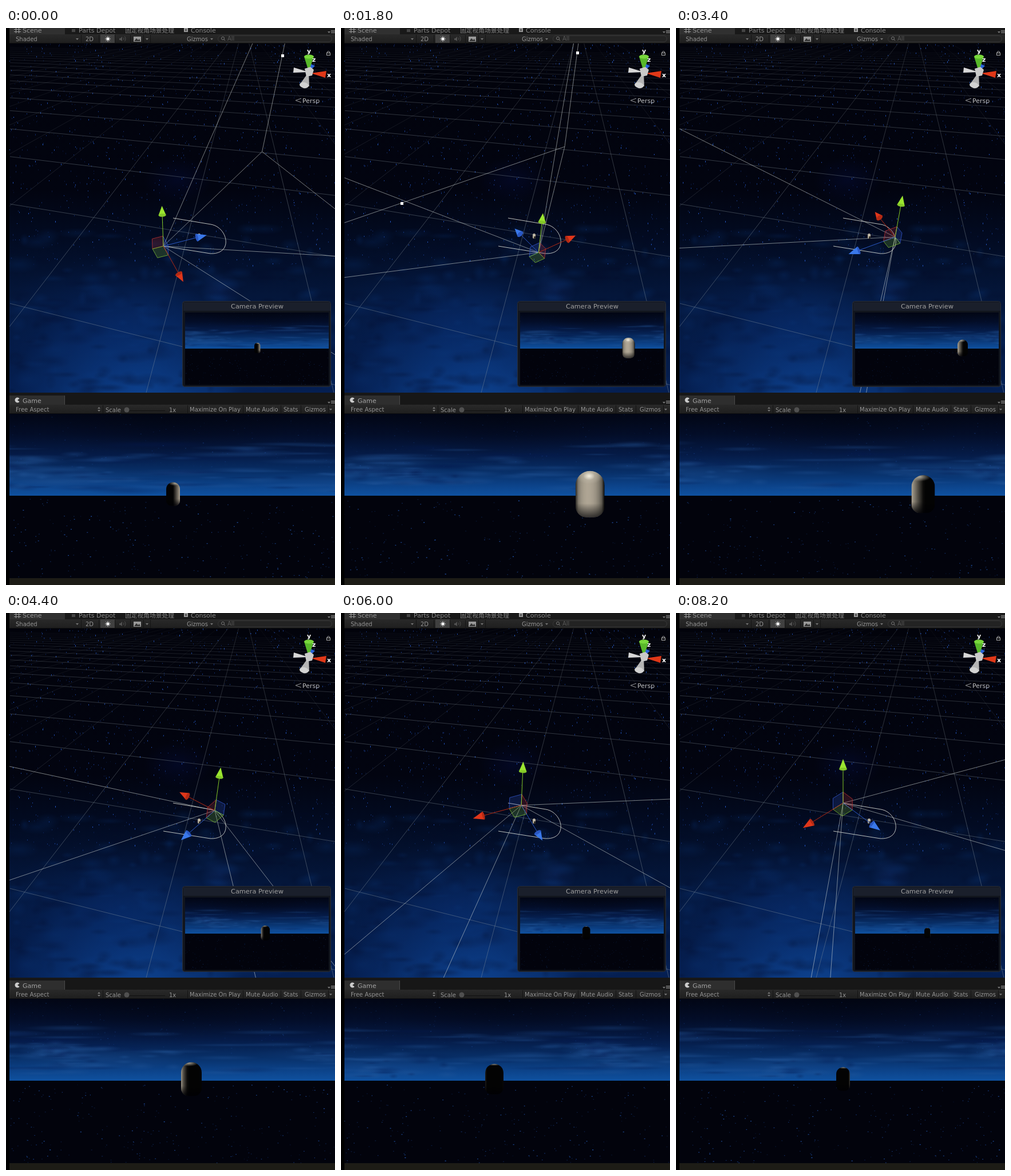
Recreate the animation shown at these times as an HTML page with a canvas. Size 575x973 px, loop 8.4 s.

```html
<!DOCTYPE html>
<html lang="en">
<head>
<meta charset="utf-8">
<title>Scene and game view</title>
<style>
  html, body { margin: 0; width: 100%; height: 100%; overflow: hidden; background: #000; }
  canvas { display: block; }
</style>
</head>
<body>
<canvas id="stage" width="575" height="973"></canvas>
<script>
const ctx = document.getElementById('stage').getContext('2d');
const LOOP = 8400, STEP = 200, RAD = Math.PI / 180;
const UI_FONT = '"DejaVu Sans", sans-serif';

// time, position along the track (0..3), heading in degrees, capsule x and width in the game view
const KEYS = [
  [600, 0, 20.7, 292, 24],
  [1200, .57, 97, 491, 62],
  [2600, 1.24, 160, 361, 36],
  [3400, 1.58, 208.5, 432, 41],
  [4400, 1.92, 232.5, 324, 36],
  [6000, 2.65, 292, 268, 32],
  [6800, 3, 312.5, 292, 24]
];

function poseAt(time) {
  const t = Math.max(KEYS[0][0], Math.min(6800, time));
  const i = Math.max(1, KEYS.findIndex(k => k[0] >= t));
  const a = KEYS[i - 1], b = KEYS[i], f = (t - a[0]) / (b[0] - a[0]);
  const [, along, heading, capsuleX, capsuleW] = a.map((v, n) => v + (b[n] - v) * f);
  return { along, heading, capsuleX, capsuleW };
}

function randomizer(seed) {
  return () => (seed = (seed * 16807) % 2147483647) / 2147483647;
}

function rect(c, x, y, w, h, fill) {
  c.fillStyle = fill;
  c.fillRect(x, y, w, h);
}

function poly(c, points, fill, stroke, close = true) {
  c.beginPath();
  points.forEach(p => c.lineTo(p[0], p[1]));
  if (close) c.closePath();
  if (fill) { c.fillStyle = fill; c.fill(); }
  if (stroke) { c.strokeStyle = stroke; c.stroke(); }
}

const line = (c, a, b, color) => poly(c, [a, b], null, color, false);

function vertical(c, y0, y1, stops) {
  const g = c.createLinearGradient(0, y0, 0, y1);
  stops.forEach(([at, color]) => g.addColorStop(at, color));
  return g;
}

function glow(c, x, y, rx, ry, rgb, alpha) {
  c.save();
  c.translate(x, y);
  c.scale(rx, ry);
  const g = c.createRadialGradient(0, 0, 0, 0, 0, 1);
  g.addColorStop(0, `rgba(${rgb},${alpha})`);
  g.addColorStop(1, `rgba(${rgb},0)`);
  rect(c, -1, -1, 2, 2, g);
  c.restore();
}

function text(c, str, x, y, size = 10, color = '#949494', font = UI_FONT, weight = 'normal') {
  c.font = `${weight} ${size}px ${font}`;
  c.fillStyle = color;
  c.fillText(str, x, y);
}

/* ---------- scene view ---------- */
const FOCAL = 528, CX = 291, CY = 332;
const SIN = Math.sin(40 * RAD), COS = Math.cos(40 * RAD);
const HALF_W = 1.05, HALF_H = .53, FAR = 1.84;

const toView = (x, z, h) => [x, z * SIN + h * COS, 1 + z * COS - h * SIN];
const project = ([x, y, z]) => [CX + FOCAL * x / z, CY - FOCAL * y / z];

function groundAt([x, y]) {
  const v = (CY - y) / FOCAL, z = v / (SIN - v * COS);
  return [(x - CX) / FOCAL * (1 + z * COS), z];
}

function line3d(a, b, color) {
  const near = .02;
  if (a[2] < near && b[2] < near) return;
  const clip = (p, q) => p[2] >= near ? p
    : p.map((v, i) => v + (q[i] - v) * (near - p[2]) / (q[2] - p[2]));
  line(ctx, project(clip(a, b)), project(clip(b, a)), color);
}

function trackPoint(u) {
  if (u <= 1) return [275 + 82 * u, 381 + 13 * u];
  if (u >= 2) return [358 - 66 * (u - 2), 343 - 11 * (u - 2)];
  const t = u - 1, s = 1 - t;
  const bez = (a, b, c, d) => a * s ** 3 + 3 * b * s * s * t + 3 * c * s * t * t + d * t ** 3;
  return [bez(357, 398, 388, 358), bez(394, 396, 348, 343)];
}

function drawGrid(c) {
  const rowY = n => 1 / (.00204 + .00112 * n) - 9;
  for (let n = -1; n < 20; n++) {
    const y = rowY(n);
    line(c, [7, y], [575, y + 568 * (y + 9) / 1957], `rgba(140,152,160,${Math.max(.06, .4 - n * .02)})`);
  }
  for (let n = -9; n < 5; n++) {
    const main = n > -2 && n < 2;
    line(c, [416, -9], [245 + 328 * n, 637], vertical(c, 27, 637, [
      [0, `rgba(140,152,160,${main ? .2 : .05})`], [.5, `rgba(140,152,160,${main ? .4 : .22})`]]));
  }
}

function drawSceneBackdrop(c) {
  c.save();
  c.beginPath();
  c.rect(6, 27, 569, 610);
  c.clip();
  rect(c, 6, 27, 569, 610, vertical(c, 27, 637, [
    [0, '#02030b'], [.42, '#020410'], [.56, '#020b22'], [.72, '#04163a'], [1, '#051f52']]));
  glow(c, 235, 650, 220, 210, '16,78,165', .75);
  glow(c, 200, 520, 220, 120, '6,40,105', .5);
  glow(c, 375, 458, 36, 32, '22,62,140', .35);
  glow(c, 300, 265, 60, 40, '4,12,55', .5);
  const rnd = randomizer(77);
  for (let i = 0; i < 260; i++) {
    const x = 6 + rnd() * 569, y = 350 + rnd() * 290, dark = rnd() < .5;
    glow(c, x, y, 8 + rnd() * 30, 4 + rnd() * 12, dark ? '1,8,36' : '10,56,125', .2);
  }
  for (let i = 0; i < 1100; i++) {
    const x = 6 + rnd() * 569, y = 27 + rnd() ** 1.3 * 390, bright = rnd();
    rect(c, Math.floor(x), Math.floor(y), 1, 1 + rnd() * 2,
      `rgba(${20 + bright * 20},${50 + bright * 45},${130 + bright * 80},${.3 + bright * bright * .6})`);
  }
  drawGrid(c);
  c.restore();
}

function drawFrustum(origin, heading) {
  const [ox, oz] = groundAt(origin);
  const c = Math.cos(heading * RAD), s = Math.sin(heading * RAD);
  const far = (side, up) => toView(
    ox + FAR * (c + side * HALF_W * s), oz + FAR * (s - side * HALF_W * c), FAR * up * HALF_H);
  const corners = [[-1, -1], [1, -1], [1, 1], [-1, 1]];
  const eye = toView(ox, oz, 0), color = 'rgba(215,220,215,.55)';
  corners.forEach((corner, i) => {
    const next = corners[(i + 1) % 4];
    line3d(eye, far(...corner), color);
    line3d(far(...corner), far(...next), color);
    const mid = far((corner[0] + next[0]) / 2, (corner[1] + next[1]) / 2);
    if (mid[2] > .1) {
      const [x, y] = project(mid);
      rect(ctx, Math.round(x) - 2, Math.round(y) - 2, 5, 5, '#fff');
    }
  });
}

function arrow([x, y], [dx, dy], color, dark) {
  const len = Math.hypot(dx, dy), ux = dx / len, uy = dy / len;
  const cone = Math.min(19, len * .23), half = 4.5 + len * .03;
  const tip = [x + dx, y + dy], base = [tip[0] - ux * cone, tip[1] - uy * cone];
  line(ctx, [x, y], base, dark);
  poly(ctx, [tip, [base[0] - uy * half, base[1] + ux * half],
    [base[0] + uy * half, base[1] - ux * half]], color);
  ctx.beginPath();
  ctx.ellipse(base[0], base[1], Math.max(2, 7 - len * .06), half, Math.atan2(uy, ux), 0, 7);
  ctx.fillStyle = dark;
  ctx.fill();
}

function drawHandles(origin, heading) {
  const groundAxis = deg => {
    const s = Math.sin(deg * RAD), k = 1 - .16 * s;
    return [86 * Math.cos(deg * RAD) * k, -58 * s * k];
  };
  const z = groundAxis(heading), x = groundAxis(heading - 90);
  const y = [(origin[0] - 292) * .145, -77 + (origin[1] - 332) * .14];
  const side = v => v.map(n => n * .25 * (v !== y && v[1] < 0 ? -1 : 1));
  const plane = (a, b, rgb) => {
    const p = side(a), q = side(b), [ox, oy] = origin;
    poly(ctx, [origin, [ox + p[0], oy + p[1]], [ox + p[0] + q[0], oy + p[1] + q[1]],
      [ox + q[0], oy + q[1]]], `rgba(${rgb},.22)`, `rgba(${rgb},.8)`);
  };
  plane(x, y, '50,85,200');
  plane(z, y, '185,50,50');
  plane(x, z, '125,185,50');
  const axes = [[x, '#e0361a', '#b32a14'], [z, '#3a78ea', '#2a58c4']].sort((a, b) => a[0][1] - b[0][1]);
  axes.forEach(([v, color, dark]) => arrow(origin, v, color, dark));
  arrow(origin, y, '#9be530', '#84c828');
}

function drawTrack() {
  ctx.beginPath();
  ctx.moveTo(275, 381);
  ctx.lineTo(357, 394);
  ctx.bezierCurveTo(398, 396, 388, 348, 358, 343);
  ctx.lineTo(292, 332);
  ctx.strokeStyle = 'rgba(235,235,225,.8)';
  ctx.stroke();
}

function drawCompass(c) {
  poly(c, [[529, 77], [503, 69], [502, 78]], '#d8d8d8');
  poly(c, [[529, 77], [531, 62], [540, 66]], '#2a62d8');
  poly(c, [[529, 76], [521, 50], [538, 50]], '#58b82a');
  c.beginPath(); c.ellipse(529.5, 50, 8.5, 3.5, 0, 0, 7); c.fillStyle = '#79d83c'; c.fill();
  poly(c, [[533, 79], [560, 75], [558, 87]], '#e03818');
  poly(c, [[529, 77], [513, 99], [530, 102]], '#b4b4b4');
  c.beginPath(); c.ellipse(521, 100, 8, 5, .2, 0, 7); c.fillStyle = '#d2d2d2'; c.fill();
  poly(c, [[522, 71], [532, 68], [538, 73], [535, 83], [525, 85]], '#c9c9c9');
  [['y', 526, 44], ['z', 535, 59], ['x', 561, 86]].forEach(([name, x, y]) =>
    text(c, name, x, y, 11, '#fff', UI_FONT, 'bold'));
  c.strokeStyle = '#aaa';
  c.strokeRect(560.5, 43.5, 6, 4);
  c.beginPath(); c.arc(563.5, 43, 2.3, Math.PI, 0); c.stroke();
  [[516, 123], [516, 130]].forEach(p => line(c, [506, 126.5], p, '#999'));
  text(c, 'Persp', 518, 131, 11, '#c0c0c0');
}

/* ---------- game view, also used for the preview ---------- */
const PX_PER_DEG = 6.1;
const stars = (() => {
  const rnd = randomizer(4242);
  return Array.from({ length: 1700 }, () => ({ az: rnd() * 360, y: rnd() ** .8 * 287, glow: rnd(), size: rnd() }));
})();
// azimuth, height, half width, half height, strength
const CLOUDS = [[70, 95, 100, 22, .4], [56, 112, 190, 24, .35], [175, 96, 210, 15, .35],
  [150, 112, 160, 16, .3], [266, 90, 65, 20, .42], [252, 104, 160, 22, .3], [330, 120, 180, 20, .25]];
// small wisps scattered inside the clouds and along the horizon
const wisps = (() => {
  const rnd = randomizer(919);
  const puff = (az, y, rx) => ({ az, y, rx, ry: 2 + rnd() * 5, dark: rnd() < .4 });
  const inClouds = CLOUDS.flatMap(([az, y, rx, ry]) => Array.from({ length: 22 }, () =>
    puff(az + (rnd() - .5) * rx / 4, y + (rnd() - .5) * ry * 1.6, 8 + rnd() * 28)));
  const bands = Array.from({ length: 150 }, () => puff(rnd() * 360, 50 + rnd() * 85, 25 + rnd() * 70));
  return inClouds.concat(bands);
})();

function wrapDegrees(d) {
  return ((d + 180) % 360 + 360) % 360 - 180;
}

function drawCapsule(x, w, heading) {
  const top = 137 - w * .73, r = w / 2, bottom = 143 + w * .74;
  const offset = (heading - 116) * RAD;
  const shade = ctx.createLinearGradient(x - r, 0, x + r, 0);
  for (let i = 0; i <= 10; i++) {
    const n = i / 5 - 1;
    const facingLight = Math.cos(offset) * Math.sqrt(1 - n * n) - Math.sin(offset) * n;
    const lit = Math.max(.02, (facingLight + .12) / 1.12) * .92;
    shade.addColorStop(i / 10, `rgb(${190 * lit},${180 * lit},${161 * lit})`);
  }
  const facing = (1 + Math.cos(offset)) / 2;
  ctx.save();
  ctx.beginPath();
  ctx.roundRect(x - r, top, w, bottom - top, [r, r, r * .75, r * .75]);
  ctx.clip();
  rect(ctx, x - r, top, w, bottom - top, shade);
  glow(ctx, x - Math.sin(offset) * r * .3, top + r * .3 * facing, r * .95, r * (.2 + facing * .4), '196,190,174', .8);
  if (facing > .7) glow(ctx, x - Math.sin(offset) * r * .5, top + r * .35, r * .4, r * .28, '255,250,235', .8);
  rect(ctx, x - r, top, w, bottom - top, vertical(ctx, top, bottom, [
    [0, 'rgba(0,0,2,0)'], [.7, 'rgba(0,0,2,0)'], [1, `rgba(0,0,4,${.95 - facing * .25})`]]));
  ctx.restore();
}

function drawGame(x, y, scale, pose) {
  ctx.save();
  ctx.translate(x, y);
  ctx.scale(scale, scale);
  ctx.beginPath();
  ctx.rect(0, 0, 569, 287);
  ctx.clip();
  rect(ctx, 0, 0, 569, 144, vertical(ctx, 0, 143, [
    [0, '#020615'], [.25, '#030d28'], [.5, '#051b47'], [.72, '#083069'], [.88, '#0c438a'], [1, '#0f519f']]));
  glow(ctx, 285, 0, 230, 75, '1,4,14', .4);
  const screenX = az => 285 + wrapDegrees(pose.heading - az) * PX_PER_DEG;
  CLOUDS.forEach(([az, cy, rx, ry, a]) => glow(ctx, screenX(az), cy, rx, ry, '32,82,150', a));
  wisps.forEach(({ az, y: wy, rx, ry, dark }) => {
    const cx = screenX(az);
    if (cx > -rx && cx < 569 + rx) glow(ctx, cx, wy, rx, ry, dark ? '3,24,78' : '36,88,156', .3);
  });
  rect(ctx, 0, 143, 569, 144, '#02030c');
  stars.forEach(s => {
    const sx = screenX(s.az);
    if (sx < -4 || sx > 573 || (s.y > 95 && s.y < 148)) return;
    const a = (s.y < 143 ? .4 : .9) * (.25 + s.glow * s.glow * .75);
    rect(ctx, sx, s.y, 1 + s.size * 1.2, 1 + s.size * .4, `rgba(38,92,185,${a})`);
  });
  drawCapsule(pose.capsuleX - 6, pose.capsuleW, pose.heading);
  ctx.restore();
}

/* ---------- editor chrome ---------- */
function bar(c, y, h) {
  rect(c, 6, y, 569, h, vertical(c, y, y + h, [[0, '#292929'], [1, '#1e1e1e']]));
  rect(c, 6, y + h - 1, 569, 1, '#101010');
}

function marker(c, x, y) {
  poly(c, [[x, y], [x + 5, y], [x + 2.5, y + 3]], '#777');
}

function menuIcon(c, y) {
  marker(c, 562, y + 2);
  for (let i = 0; i < 3; i++) rect(c, 568, y + i * 2, 7, 1, '#888');
}

function separators(c, y, xs) {
  xs.forEach(x => rect(c, x, y, 1, 14, '#141414'));
}

function drawChrome(c) {
  rect(c, 0, 0, 575, 11, '#191919');
  rect(c, 6, 0, 97, 11, '#303030');
  [17, 22].forEach(x => rect(c, x, 0, 1, 9, '#999'));
  [2, 6].forEach(y => rect(c, 14, y, 12, 1, '#999'));
  text(c, 'Scene', 29, 8, 11);
  rect(c, 115, 2, 6, 5, '#444');
  text(c, 'Parts Depot', 127, 8, 11, '#858585');
  text(c, '固定视角场景处理', 208, 8, 10.75, '#858585', '"Noto Sans CJK SC", "Noto Sans CJK", sans-serif');
  rect(c, 311, 0, 7, 7, '#999');
  rect(c, 313, 2, 3, 1, '#222');
  rect(c, 313, 4, 3, 1, '#222');
  text(c, 'Console', 323, 8, 11, '#858585');
  menuIcon(c, 4);

  bar(c, 11, 16);
  rect(c, 165, 11, 25, 15, '#404040');
  text(c, 'Shaded', 17, 23);
  marker(c, 122, 18);
  text(c, '2D', 139, 23);
  for (let i = 0; i < 4; i++) {
    const a = i * Math.PI / 4, dx = Math.cos(a) * 5, dy = Math.sin(a) * 5;
    line(c, [178 - dx, 19 - dy], [178 + dx, 19 + dy], '#ccc');
  }
  c.beginPath(); c.arc(178, 19, 2.5, 0, 7); c.fillStyle = '#fff'; c.fill();
  poly(c, [[198, 18], [200, 18], [203, 15], [203, 23], [200, 21], [198, 21]], '#505050');
  [3, 6].forEach(r => { c.beginPath(); c.arc(203, 19, r, -.8, .8); c.strokeStyle = '#505050'; c.stroke(); });
  rect(c, 223, 15, 13, 9, '#999');
  poly(c, [[224, 23], [228, 18], [231, 21], [233, 19], [235, 23]], '#333');
  marker(c, 244, 18);
  text(c, 'Gizmos', 316, 23);
  marker(c, 357, 18);
  separators(c, 12, [131, 162, 190, 217, 240, 252]);
  c.beginPath(); c.roundRect(370.5, 13.5, 199, 11, 5.5); c.fillStyle = '#232323'; c.fill();
  c.strokeStyle = '#383838'; c.stroke();
  c.beginPath(); c.arc(379, 18, 2.5, 0, 7); c.strokeStyle = '#777'; c.stroke();
  line(c, [381, 20], [383, 22], '#777');
  text(c, 'All', 387, 22, 10, '#585858');

  rect(c, 0, 637, 575, 22, '#171717');
  rect(c, 6, 642, 96, 17, '#2e2e2e');
  rect(c, 102, 642, 1, 16, '#4a4a4a');
  c.beginPath(); c.moveTo(20, 650); c.arc(20, 650, 4.5, .65, 5.6); c.fillStyle = '#ccc'; c.fill();
  text(c, 'Game', 29, 655, 11, '#a2a2a2');
  menuIcon(c, 651);
  bar(c, 658, 16);
  text(c, 'Free Aspect', 17, 670);
  marker(c, 160, 667);
  poly(c, [[160, 665], [165, 665], [162.5, 662]], '#777');
  text(c, 'Scale', 174, 671);
  rect(c, 210, 668, 68, 1, '#111');
  c.beginPath(); c.arc(211, 667, 4.5, 0, 7); c.fillStyle = '#505050'; c.fill();
  text(c, '1x', 285, 671);
  text(c, 'Maximize On Play', 321, 670);
  text(c, 'Mute Audio', 419, 670);
  text(c, 'Stats', 485, 670);
  text(c, 'Gizmos', 522, 670);
  marker(c, 565, 665);
  separators(c, 659, [169, 317, 414, 480, 515, 563]);
  rect(c, 6, 961, 569, 12, '#1d1c16');
  rect(c, 0, 0, 6, 973, '#000');
}

function layer(draw) {
  const el = document.createElement('canvas');
  el.width = 575;
  el.height = 973;
  draw(el.getContext('2d'));
  return el;
}

const backdrop = layer(drawSceneBackdrop);
const chrome = layer(c => { drawChrome(c); drawCompass(c); });

function drawPreview(pose) {
  ctx.beginPath();
  ctx.roundRect(308.5, 477.5, 259, 149, 4);
  ctx.fillStyle = '#11151d';
  ctx.fill();
  ctx.strokeStyle = '#292e38';
  ctx.stroke();
  rect(ctx, 310, 479, 257, 15, '#1a1f2b');
  text(ctx, 'Camera Preview', 393, 490, 11.3, '#a0a0a0');
  drawGame(313, 497, .4415, pose);
}

function render(time) {
  const pose = poseAt(Math.floor(time / STEP) * STEP);
  const origin = trackPoint(pose.along);
  ctx.drawImage(backdrop, 0, 0);
  ctx.save();
  ctx.beginPath();
  ctx.rect(6, 27, 569, 610);
  ctx.clip();
  ctx.lineWidth = 1;
  drawTrack();
  drawFrustum(origin, pose.heading);
  ctx.beginPath();
  ctx.roundRect(335, 359, 5, 9, 2.5);
  ctx.fillStyle = '#bdb5a2';
  ctx.fill();
  rect(ctx, 337, 364, 3, 4, '#39352e');
  drawHandles(origin, pose.heading);
  drawPreview(pose);
  ctx.restore();
  drawGame(6, 674, 1, pose);
  ctx.drawImage(chrome, 0, 0);
}

const start = performance.now();
function tick() {
  render((performance.now() - start) % LOOP);
  requestAnimationFrame(tick);
}
tick();
</script>
</body>
</html>
```
